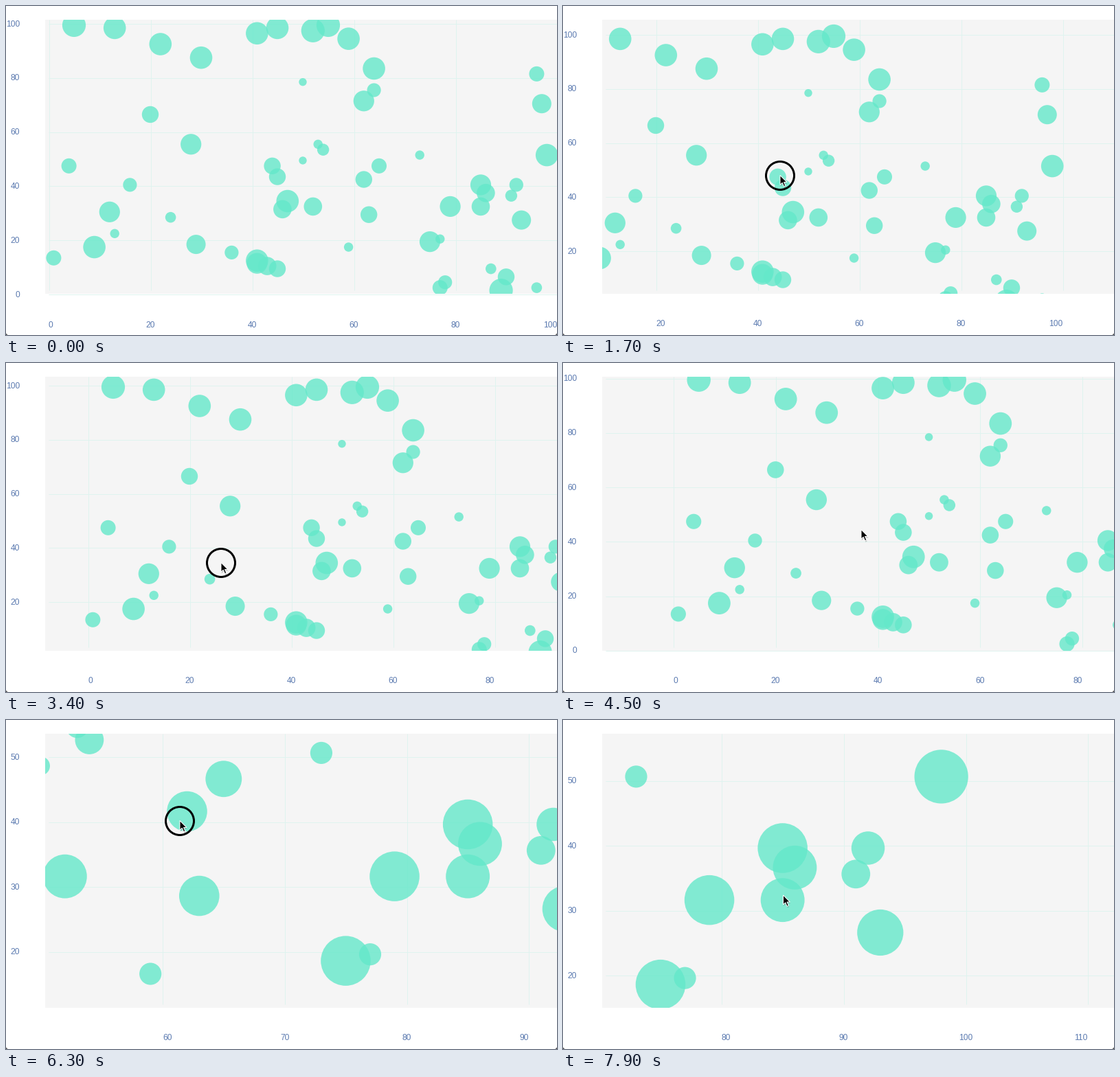
A matplotlib script for the animation above (8 s loop, 802 by 479 pixels).

```python
import math

import numpy as np
import matplotlib.pyplot as plt
from matplotlib.animation import FuncAnimation
from matplotlib.collections import LineCollection
from matplotlib.patches import Circle, Polygon, Rectangle

W, H, DPI = 802, 479, 64
PT = 72 / DPI  # points per pixel
FRAMES, INTERVAL = 80, 100

LEFT, TOP, RIGHT, BOTTOM = 57, 20, 802, 419
UNIT_X, UNIT_Y = 7.4, 3.94
ORIGIN = (62, 418)
ZOOM = 2.401

DOT, PANEL, GRID, INK = "#64e8ca", "#f5f5f5", "#dff3ef", "#5b7ab0"

# Radius -> data points
DOTS = {
    17.1: [(5, 99), (52, 97), (55, 99), (89, 1)],
    16.3: [(13, 98), (22, 92), (30, 87), (64, 83), (59, 94), (45, 98),
           (41, 96), (98, 51), (47, 34), (41, 12), (9, 17)],
    15.1: [(28, 55), (85, 40), (62, 71), (12, 30), (79, 32), (75, 19), (41, 11)],
    14.0: [(97, 70), (29, 18), (93, 27)],
    13.3: [(43, 10), (46, 31), (52, 32), (85, 32), (86, 37)],
    12.2: [(20, 66), (44, 47), (63, 29), (45, 43), (62, 42), (90, 6), (45, 9)],
    11.0: [(4, 47), (1, 13), (65, 47), (96, 81), (77, 2)],
    10.1: [(64, 75), (16, 40), (36, 15), (78, 4), (92, 40)],
    8.7: [(54, 53), (91, 36)],
    7.8: [(24, 28), (87, 9), (96, 2)],
    6.7: [(13, 22), (53, 55), (59, 17), (73, 51), (77, 20)],
    5.7: [(50, 78), (50, 49)],
}
points = np.array([p for group in DOTS.values() for p in group], float)
radii = np.array([r for r, group in DOTS.items() for _ in group])

# Pointer script: time in seconds, position reached, what happens on the way
PATH = [
    (0.1, 470, 330, "move"),
    (0.4, 391, 231, "move"),
    (1.7, 316, 247, "drag"),
    (2.0, 280, 235, "drag"),
    (2.25, 335, 225, "move"),
    (2.6, 365, 213, "drag"),
    (2.85, 440, 221, "drag"),
    (3.15, 250, 284, "move"),
    (3.4, 313, 291, "drag"),
    (3.7, 356, 282, "drag"),
    (4.3, 434, 243, "move"),
    (4.465, 434, 243, "move"),
    (5.2, 434, 243, "zoom"),
    (5.4, 640, 221, "move"),
    (5.8, 331, 157, "drag"),
    (6.0, 563, 211, "move"),
    (6.3, 253, 147, "drag"),
    (6.5, 200, 140, "drag"),
    (6.9, 620, 214, "move"),
    (7.75, 320.5, 255.5, "drag"),
    (8.0, 320.5, 255.5, "move"),
]
FIRST_DRAG = 0.4


def smooth(u):
    u = min(max(u, 0), 1)
    return u * u * (3 - 2 * u)


def view_at(t):
    """Origin, scale, pointer position and button state at time t."""
    x0, y0 = ORIGIN
    k = 1.0
    cx, cy = PATH[0][1:3]
    down = False
    for (ta, xa, ya, _), (tb, xb, yb, mode) in zip(PATH, PATH[1:]):
        if t <= ta:
            break
        u = smooth((t - ta) / (tb - ta))
        dx, dy = (xb - xa) * u, (yb - ya) * u
        cx, cy = xa + dx, ya + dy
        down = mode == "drag"
        if down:
            x0, y0 = x0 + dx, y0 + dy
        elif mode == "zoom":
            f = ZOOM ** u
            k *= f
            x0, y0 = cx + (x0 - cx) * f, cy + (y0 - cy) * f
    return x0, y0, k, cx, cy, down


def ticks(lo, hi, step):
    return [i * step for i in range(math.ceil(lo / step), math.floor(hi / step) + 1)]


fig = plt.figure(figsize=(W / DPI, H / DPI), dpi=DPI, facecolor="white")
ax = fig.add_axes([0, 0, 1, 1])
ax.axis("off")

panel = Rectangle((LEFT, TOP), RIGHT - LEFT, BOTTOM - TOP, fc=PANEL, lw=0, zorder=0)
ax.add_patch(panel)
grid = LineCollection([], colors=GRID, linewidths=PT, zorder=1)
ax.add_collection(grid, autolim=False)
dots = ax.scatter(points[:, 0], points[:, 1], c=DOT, alpha=0.8, linewidths=0, zorder=2)
dots.set_clip_path(panel)

for x, d in ((0, 2.5), (W, -2.5)):
    ax.add_patch(Polygon([(x, H), (x + d, H), (x, H - 2.5)], fc="#555555", lw=0))

font = dict(family="Liberation Sans", size=12 * PT, color=INK, va="baseline")
x_labels = [ax.text(0, 0, "", **font) for _ in range(14)]
y_labels = [ax.text(0, 0, "", ha="right", **font) for _ in range(14)]

ARROW = np.array([(0, 0), (0, 13.8), (3.2, 10.8), (5.6, 16.2),
                  (7.9, 15.2), (5.5, 10), (9.9, 10)])
ring = Circle((0, 0), 20.5, fill=False, ec="black", lw=3 * PT, zorder=5)
shadow = Polygon(ARROW, fc="black", alpha=0.18, lw=0, zorder=6)
arrow = Polygon(ARROW, fc="black", ec="white", lw=PT, zorder=7)
for patch in (ring, shadow, arrow):
    ax.add_patch(patch)

ax.set_xlim(0, W)
ax.set_ylim(H, 0)


def draw(i):
    t = i * INTERVAL / 1000
    x0, y0, k, cx, cy, down = view_at(t)
    ux, uy = UNIT_X * k, UNIT_Y * k

    dots.set_offsets(np.column_stack([x0 + points[:, 0] * ux, y0 - points[:, 1] * uy]))
    dots.set_sizes((2 * radii * k * PT) ** 2)

    # The axis sits slightly off the dots, growing with the scale
    gy = y0 + 1.5 - 3.8 * (k - 1)
    step = 20 if k < math.sqrt(2) else 10
    xs = ticks((LEFT - x0) / ux, (RIGHT + 0.5 - x0) / ux, step)
    ys = ticks((gy - BOTTOM - 0.6) / uy, (gy - TOP) / uy, step)

    lines = []
    for label in x_labels + y_labels:
        label.set_text("")
    base = 466 if t > FIRST_DRAG else 468
    for label, v in zip(x_labels, xs):
        x = x0 + v * ux
        lines.append([(math.floor(x) + 0.5, TOP), (math.floor(x) + 0.5, BOTTOM - 5)])
        label.set_text(str(v))
        label.set_position((x, base))
        label.set_ha("left" if v == xs[0] else "right" if v == xs[-1] else "center")
    for label, v in zip(y_labels, ys):
        y = gy - v * uy
        lines.append([(LEFT + 5, math.floor(y) + 0.5), (RIGHT, math.floor(y) + 0.5)])
        label.set_text(str(v))
        label.set_position((20, y + 4))
    grid.set_segments(lines)

    ring.center = (cx, cy)
    ring.set_visible(down)
    arrow.set_xy(ARROW + (cx, cy - 0.5))
    shadow.set_xy(ARROW + (cx + 0.8, cy + 1.5))
    for patch in (arrow, shadow):
        patch.set_visible(t > 0)
    return [grid, dots, ring, shadow, arrow, *x_labels, *y_labels]


anim = FuncAnimation(fig, draw, frames=FRAMES, interval=INTERVAL,
                     repeat=True, repeat_delay=0, blit=False)
plt.show()
```
